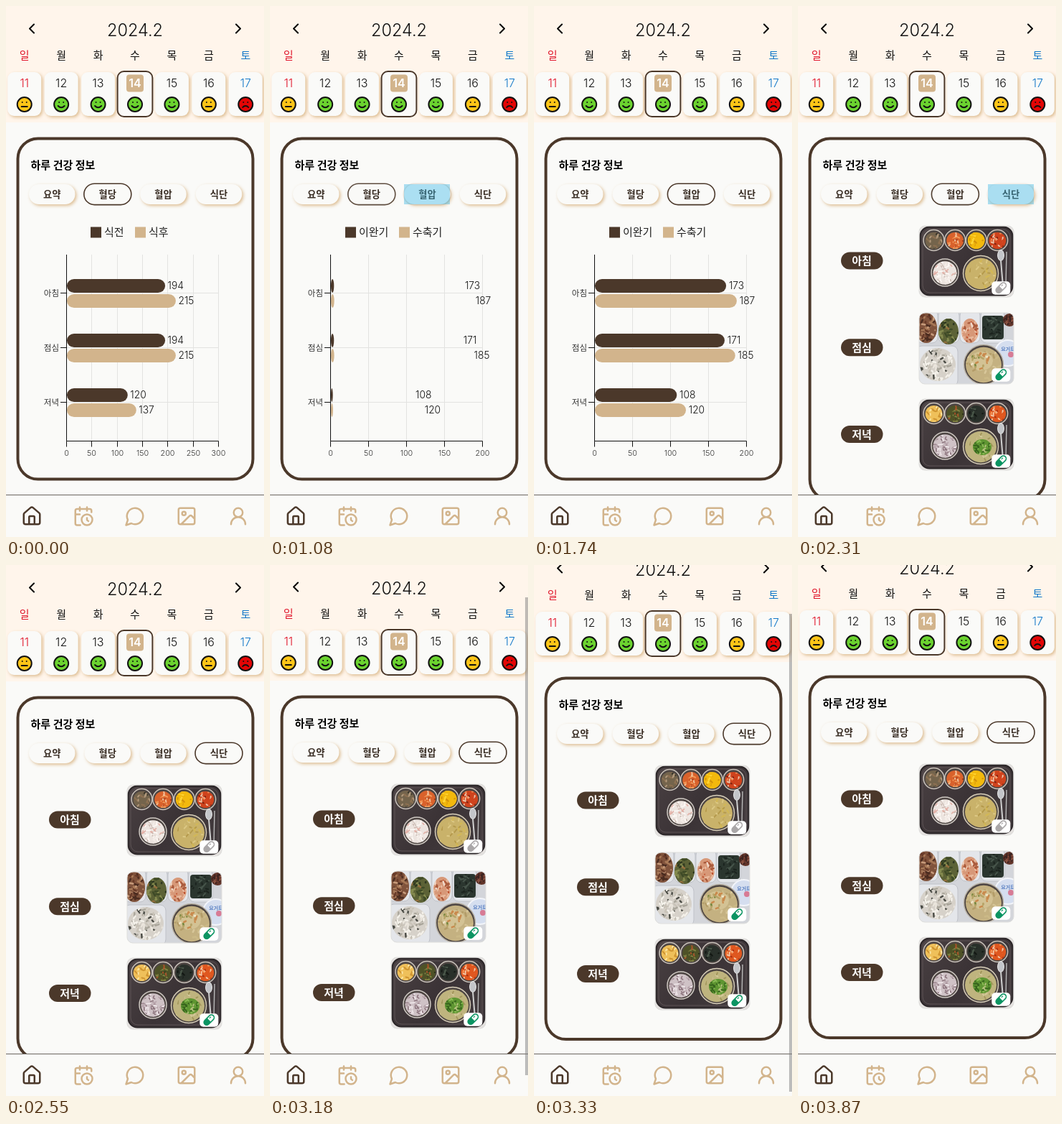
An HTML page with a canvas for the animation above (4410 ms loop, 360 by 739 pixels).

```html
<!DOCTYPE html>
<html lang="ko">
<head>
<meta charset="utf-8">
<title>건강 정보</title>
<style>
html, body { margin: 0; width: 100%; height: 100%; overflow: hidden; background: #fafaf8; }
canvas { display: block; width: 360px; height: 739px; }
</style>
</head>
<body>
<canvas id="stage"></canvas>
<script>
const W = 360, H = 739, LOOP = 4410, STEP = 30;
const DARK = '#4b382a', TAN = '#d2b48c', PAPER = '#fafaf8', INK = '#111';
const canvas = document.getElementById('stage');
const ctx = canvas.getContext('2d');
const dpr = window.devicePixelRatio || 1;
canvas.width = W * dpr;
canvas.height = H * dpr;

const ramp = (t, from, to) => Math.min(1, Math.max(0, (t - from) / (to - from)));

function text(str, x, y, size, { color = INK, weight = 350, align = 'center' } = {}) {
  ctx.font = `${weight} ${size}px Inter, "Noto Sans CJK KR", "Noto Sans CJK", sans-serif`;
  ctx.textAlign = align;
  ctx.fillStyle = color;
  ctx.fillText(str, x, y + size * 0.365);
}

function box(x, y, w, h, r, fill, stroke, width = 1) {
  ctx.beginPath();
  ctx.roundRect(x, y, w, h, r);
  if (fill) { ctx.fillStyle = fill; ctx.fill(); }
  if (stroke) { ctx.strokeStyle = stroke; ctx.lineWidth = width; ctx.stroke(); }
}

function raised(x, y, w, h, r, alpha = 1) {
  ctx.save();
  ctx.shadowColor = `rgba(218,184,138,${0.9 * alpha})`;
  ctx.shadowBlur = 4 * dpr;
  ctx.shadowOffsetX = ctx.shadowOffsetY = 2 * dpr;
  box(x, y, w, h, r, PAPER);
  ctx.restore();
}

function line(x1, y1, x2, y2, color, width = 1) {
  ctx.beginPath();
  ctx.moveTo(x1, y1);
  ctx.lineTo(x2, y2);
  ctx.strokeStyle = color;
  ctx.lineWidth = width;
  ctx.stroke();
}

function disc(x, y, rx, ry, fill, stroke, width = 1) {
  ctx.beginPath();
  ctx.ellipse(x, y, rx, ry, 0, 0, 7);
  ctx.fillStyle = fill;
  ctx.fill();
  if (stroke) { ctx.strokeStyle = stroke; ctx.lineWidth = width; ctx.stroke(); }
}

// Strokes a path drawn on a 24-unit grid, centred on (x, y).
function icon(path, x, y, size, color) {
  ctx.save();
  ctx.translate(x - size / 2, y - size / 2);
  ctx.scale(size / 24, size / 24);
  ctx.lineCap = ctx.lineJoin = 'round';
  ctx.lineWidth = 2;
  ctx.strokeStyle = color;
  ctx.stroke(new Path2D(path));
  ctx.restore();
}

const NAV = [
  'M15 21v-8a1 1 0 0 0-1-1h-4a1 1 0 0 0-1 1v8M3 10a2 2 0 0 1 .7-1.5l7-6a2 2 0 0 1 2.6 0l7 6A2 2 0 0 1 21 10v9a2 2 0 0 1-2 2H5a2 2 0 0 1-2-2z',
  'M21 7.5V6a2 2 0 0 0-2-2H5a2 2 0 0 0-2 2v14a2 2 0 0 0 2 2h3.5M16 2v4M8 2v4M3 10h5M17.5 17.5L16 16.25V14M22 16a6 6 0 1 1-12 0 6 6 0 0 1 12 0',
  'M7.9 20A9 9 0 1 0 4 16.1L2 22z',
  'M5 3h14a2 2 0 0 1 2 2v14a2 2 0 0 1-2 2H5a2 2 0 0 1-2-2V5a2 2 0 0 1 2-2M11 9a2 2 0 1 1-4 0 2 2 0 0 1 4 0M21 15l-3.1-3.1a2 2 0 0 0-2.8 0L6 21',
  'M17 8a5 5 0 1 1-10 0 5 5 0 0 1 10 0M20 21a8 8 0 0 0-16 0'
];
const FACES = {
  meh: ['#ffc517', 'M8 15h8'],
  good: ['#6bd32f', 'M7.5 14q4.5 4.6 9 0'],
  bad: ['#e30505', 'M16 16s-1.5-2-4-2-4 2-4 2']
};
const WEEK = [
  ['일', 11, 'meh', '#e0162b'], ['월', 12, 'good'], ['화', 13, 'good'], ['수', 14, 'good'],
  ['목', 15, 'good'], ['금', 16, 'meh'], ['토', 17, 'bad', '#1479c9']
];

function drawHeader() {
  ctx.fillStyle = '#fff5eb';
  ctx.fillRect(0, 0, W, 162);
  icon('M15 18l-6-6 6-6', 36, 31.5, 24, '#000');
  icon('M9 18l6-6-6-6', 324, 31.5, 24, '#000');
  text('2024.2', 180, 33.3, 23.5);
  WEEK.forEach(([day, date, mood, color = INK], i) => {
    const x = (i + 0.5) * W / 7, today = date === 14;
    text(day, x, 69, 15, { color });
    if (today) {
      box(x - 24.4, 91, 48.8, 63, 9, PAPER, DARK, 2);
      box(x - 12, 95.5, 24, 24, 4, TAN);
    } else {
      raised(x - 23.5, 92, 47, 61, 9);
    }
    text(date, x, 107.5, 16, today ? { color: '#fff', weight: 600 } : { color });
    const [fill, mouth] = FACES[mood];
    disc(x, 137, 10, 10, fill, '#111', 2);
    icon(mouth + 'M9 9h.01M15 9h.01', x, 137, 24, '#111');
  });
}

const TABS = ['요약', '혈당', '혈압', '식단'];
const tabX = i => 64.2 + 77.6 * i;

function drawTabs(t) {
  const first = ramp(t, 1060, 1250), second = ramp(t, 2305, 2490);
  const chosen = [0, 1 - first, first - second, second];
  TABS.forEach((label, i) => {
    const x = tabX(i), on = chosen[i];
    raised(x - 32.2, 248, 64.5, 28, 14, 1 - on);
    if (on > 0) {
      ctx.globalAlpha = on;
      box(x - 33, 247.2, 66, 29.4, 14.7, PAPER, DARK, 1.6);
      ctx.globalAlpha = 1;
    }
    text(label, x, 262, 13.3, { color: '#3a2e25', weight: 600 });
  });
  tapGlow(2, t, 1080);
  tapGlow(3, t, 2310);
}

function tapGlow(tab, t, start) {
  if (t < start) return;
  const alpha = 0.4 * (1 - ramp(t, start + 60, start + 210));
  ctx.fillStyle = `rgba(51,181,229,${alpha})`;
  ctx.fillRect(Math.round(tabX(tab) - 32.4), 248, 64, 28);
}

const MEALS = ['아침', '점심', '저녁'];
const SUGAR = { max: 300, names: ['식전', '식후'], legendX: 118, rows: [[194, 215], [194, 215], [120, 137]] };
const PRESSURE = { max: 200, names: ['이완기', '수축기'], legendX: 105, rows: [[173, 187], [171, 185], [108, 120]] };

function drawChart({ max, names, legendX, rows }, grow) {
  const left = 84.5, width = 212, top = 346, bottom = 605.5, colors = [DARK, TAN];
  names.forEach((name, i) => {
    const x = i ? 180 : legendX;
    ctx.fillStyle = colors[i];
    ctx.fillRect(x, 307.5, 15, 15);
    text(name, x + 19, 315, 15, { align: 'left', color: '#222' });
  });
  for (let v = 0; v <= max; v += 50) {
    const x = Math.floor(left + width * v / max) + 0.5;
    line(x, top, x, bottom, '#e3e3e1');
    line(x, bottom, x, bottom + 8, '#111');
    text(v, x, 622, 10.8, { color: '#333' });
  }
  rows.forEach((_, i) => {
    const y = 399.5 + 76 * i;
    line(left, y, left + width, y, '#e3e3e1');
    line(76, y, left, y, '#111');
    text(MEALS[i], 74, y, 11.5, { align: 'right', color: '#333' });
  });
  rows.forEach((pair, i) => pair.forEach((value, j) => {
    const y = 380 + 76 * i + 21 * j, full = width * value / max, w = full * grow;
    box(left + 0.5, y, w, 19, { x: Math.min(10, w / 2), y: 9.5 }, colors[j]);
    text(value, left + full + 4, y + 8.8, 13.8, { align: 'left' });
  }));
  line(left, top, left, bottom, '#111');
  line(left, bottom, left + width, bottom, '#111');
}

function randomizer(seed) {
  return () => (seed = (seed * 16807) % 2147483647) / 2147483647;
}

// A heap of food: base tone with short strokes of the given tones.
function food(x, y, rx, ry, colors, count, seed, width = 2) {
  const rnd = randomizer(seed * 7919);
  ctx.save();
  disc(x, y, rx, ry, colors[0]);
  ctx.clip();
  ctx.lineCap = 'round';
  for (let i = 0; i < count; i++) {
    const a = rnd() * 6.28, d = Math.sqrt(rnd()) * 0.95, len = 1 + rnd() * 5, dir = rnd() * 6.28;
    const px = x + rx * d * Math.cos(a), py = y + ry * d * Math.sin(a);
    line(px, py, px + len * Math.cos(dir), py + len * Math.sin(dir),
      colors[Math.floor(rnd() * colors.length)], width);
  }
  ctx.restore();
}

function bowl(x, y, r, rim, colors, count, seed, width) {
  disc(x, y, r, r, '#4d4542', rim, 1.5);
  food(x, y + 0.5, r - 2.5, r - 2.8, colors, count, seed, width);
}

function darkTray(sides, rice, soup, garnish) {
  ctx.fillStyle = '#e4e1df';
  ctx.fillRect(0, 0, 132, 99);
  const shade = ctx.createLinearGradient(0, 0, 132, 99);
  shade.addColorStop(0, '#4a4143');
  shade.addColorStop(0.5, '#3b3336');
  shade.addColorStop(1, '#453d40');
  box(1.5, 1.5, 129, 95, 13, shade, '#2b2628', 2);
  box(5, 5, 122, 88, 10, null, '#5c5355');
  sides.forEach((colors, i) => bowl(20.5 + 29.6 * i, 20, 14.4, '#c9c2ba', colors, 26, i + 3));
  bowl(36, 65, 19, '#cfc9c3', rice, 70, 11, 1.6);
  bowl(86, 66, 24.5, '#d6cdb9', soup, 36, 17);
  if (garnish) food(88, 67, 13, 11, garnish, 45, 23);
  disc(114, 41, 4.4, 7.5, '#c3c5c9', '#eeeeee');
  line(114, 48, 117, 84, '#d0d0d0', 2);
  line(122, 36, 121, 82, '#b9b9b9', 1.4);
}

function whiteTray() {
  ctx.fillStyle = '#d3d5da';
  ctx.fillRect(0, 0, 132, 99);
  [[-4, -4, 30, 46], [27, -4, 29, 46], [57, -4, 28, 46], [86, -4, 33, 46], [-4, 46, 58, 56]]
    .forEach(([x, y, w, h]) => box(x, y, w, h, 8, '#e4e6ea', '#bfc2c8'));
  food(10, 21, 15, 21, ['#80533c', '#a97a58', '#4b2c20', '#c79b7b', '#693b29'], 46, 31, 2.6);
  food(41, 26, 14, 18, ['#5c6236', '#2f3820', '#858b4f', '#946f3e', '#3e4a26'], 42, 37, 2.6);
  food(71, 25, 12, 17, ['#d79878', '#bd4f2b', '#f0dacb', '#a8593b', '#e8b99d'], 36, 41, 2.4);
  box(88, 4, 30, 33, 4, '#2b362f');
  food(103, 20, 14, 16, ['#2b362f', '#46544a', '#1b231e'], 40, 43);
  food(126, 10, 9, 9, ['#63352a', '#3b2320', '#8a5140'], 25, 47);
  food(26, 72, 25, 23, ['#d6d1c9', '#f4f1ea', '#4a4b45', '#aaa69b', '#ebe6dd', '#c9c3b8'], 105, 53, 2.4);
  disc(124, 56, 18, 18, '#d5deef', '#f3f5fa', 2);
  text('요거트', 124, 50, 7, { color: '#5d83c4', weight: 700 });
  disc(128, 58, 4, 4, '#d77b95');
  bowl(90, 72, 27.5, '#b9b2a5', ['#c4b181', '#d8c79a', '#b39c68', '#cbb987'], 50, 59, 2.6);
  food(87, 67, 16, 13, ['#d3c294', '#c98a4d', '#76873f', '#efe4c8', '#b7a468'], 30, 61, 2.6);
}

const RICE = ['#ece4df', '#fffaf7', '#cbbbb3', '#f6efea'];
const PHOTOS = [
  () => darkTray([
    ['#74644c', '#3a372b', '#b0977a', '#8d7052'], ['#d9622c', '#f39a58', '#9b3617', '#f0c09a'],
    ['#f3b90d', '#ffd536', '#d3930a'], ['#cf431d', '#f18a52', '#86250f', '#eec1a4']
  ], [...RICE, '#e3b0a6'], ['#c9b26a', '#dcc884', '#b59a4c', '#d3b854']),
  whiteTray,
  () => darkTray([
    ['#efc05a', '#fbe5a2', '#cf9430'], ['#4e5227', '#7f8242', '#2a2f18', '#a8532b'],
    ['#29302a', '#4a584a', '#131814'], ['#df571f', '#f5985a', '#ad3312', '#f4c6a3']
  ], ['#cfc2c6', '#f1e9ec', '#8b737c', '#b7a4ab'], ['#bfb47e', '#d3c99a', '#a3975c'],
  ['#5f9632', '#8abb55', '#37651d', '#b3bf7c'])
];

function pill(x, y, color) {
  box(x - 13, y - 9, 26, 18.5, 5, '#fff');
  ctx.save();
  ctx.translate(x, y);
  ctx.rotate(-Math.PI / 4);
  box(-8.5, -3.8, 17, 7.6, 3.8, '#fff', color, 1.6);
  box(-8.5, -3.8, 8.5, 7.6, [3.8, 0, 0, 3.8], color);
  line(2, -1.3, 5, -1.3, color, 1.1);
  ctx.restore();
}

function drawMeals() {
  MEALS.forEach((meal, i) => {
    const y = 354.5 + 120.8 * i, top = Math.round(y - 48.8);
    box(60, y - 12, 58.5, 24, 12, DARK);
    text(meal, 89, y, 15, { color: '#fff', weight: 700 });
    ctx.save();
    ctx.translate(169, top);
    ctx.beginPath();
    ctx.roundRect(0, 0, 132, 99, 8);
    ctx.clip();
    PHOTOS[i]();
    ctx.restore();
    box(169, top, 132, 99, 8, null, '#dededc');
    pill(283.3, top + 86.2, i ? '#0b9462' : '#aaa7a8');
  });
}

function drawNav() {
  ctx.fillStyle = PAPER;
  ctx.fillRect(0, 680, W, 59);
  line(0, 680.5, W, 680.5, '#6b6660');
  NAV.forEach((path, i) => icon(path, 36 + 72 * i, 710, 30, i ? TAN : DARK));
}

const SCROLL = [0, 1, 6, 13, 19, 24, 27, 29];
const scrollAt = t => SCROLL[Math.min(7, Math.max(0, Math.floor((t - 3150) / STEP)))];

function drawScrollbar(t, scroll) {
  if (t < 3180) return;
  ctx.fillStyle = `rgba(128,128,128,${0.5 * (1 - ramp(t, 3630, 3870))})`;
  ctx.fillRect(356, Math.round(44 + 0.9 * scroll), 4, 665);
}

// Near-critically damped spring used for the bars.
function spring(ms) {
  const a = 13 * Math.max(0, ms) / 1000;
  return 1 - (1 + a) * Math.exp(-a);
}

function draw(t) {
  const scroll = scrollAt(t), meals = t >= 2310;
  ctx.setTransform(dpr, 0, 0, dpr, 0, 0);
  ctx.fillStyle = PAPER;
  ctx.fillRect(0, 0, W, H);
  ctx.save();
  ctx.translate(0, -scroll);
  drawHeader();
  box(16.5, 184.5, 328, meals ? 502.5 : 474, 28, PAPER, DARK, 4);
  text('하루 건강 정보', 34.5, 222, 15, { align: 'left', weight: 700, color: '#000' });
  drawTabs(t);
  if (meals) drawMeals();
  else if (t >= 1080) drawChart(PRESSURE, spring(t - 1062));
  else drawChart(SUGAR, 1);
  ctx.restore();
  drawNav();
  drawScrollbar(t, scroll);
}

let shown = -1;
function tick() {
  const t = Math.floor(performance.now() % LOOP / STEP) * STEP;
  if (t !== shown) draw(shown = t);
  requestAnimationFrame(tick);
}
tick();
</script>
</body>
</html>
```
